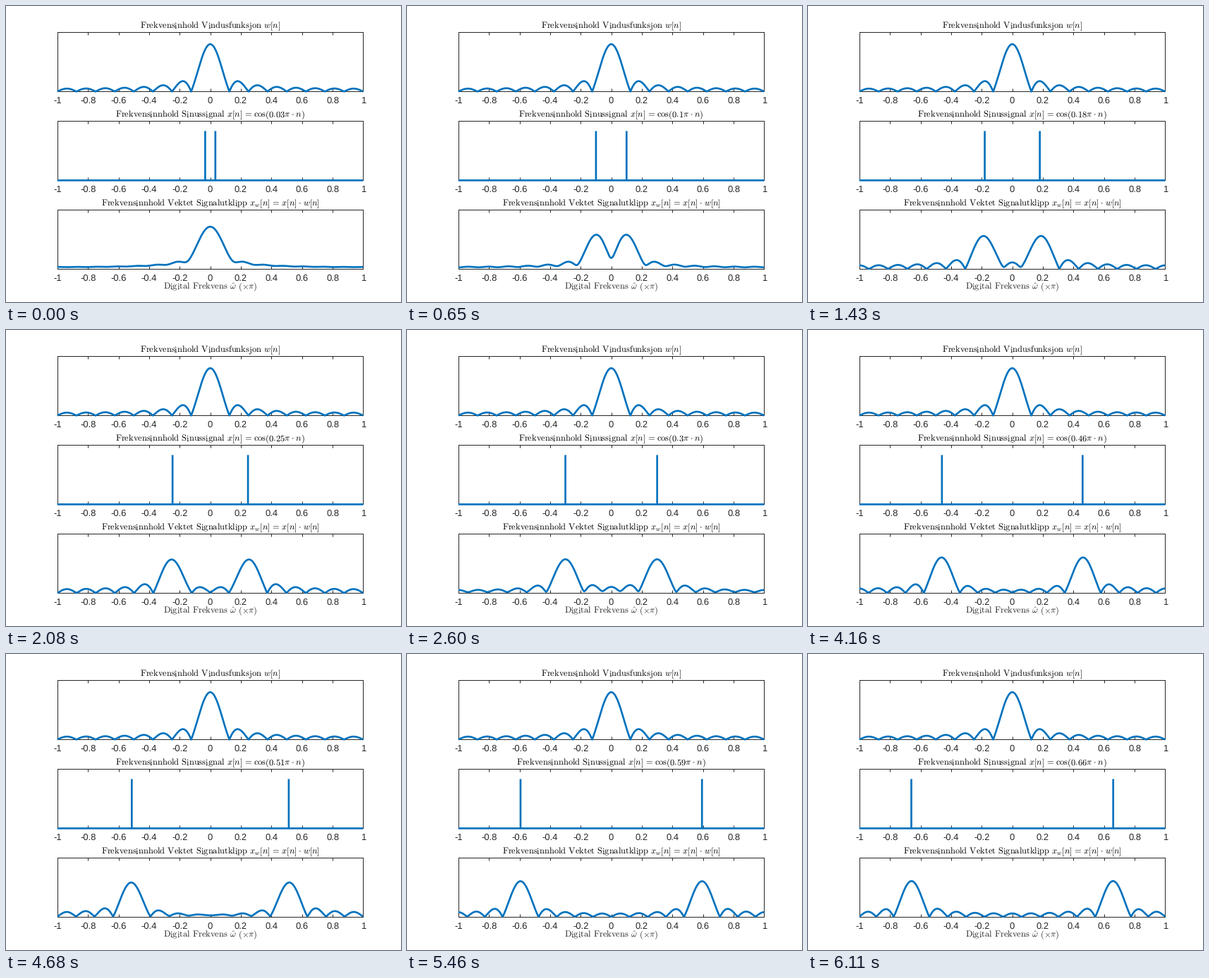
Animation of 560 by 420 pixels, one loop 6240 ms. Source, as a matplotlib script:

```python
import numpy as np
import matplotlib.pyplot as plt
from matplotlib.animation import FuncAnimation

W, H, DPI = 560, 420, 100
FRAMES, INTERVAL = 48, 130
N = 16                      # window length
BLUE, GREY = "#0072BD", "#262626"
LEFT, RIGHT, HEIGHT = 72.8, 506.4, 84
BOTTOMS = (298.6, 172.6, 46.6)
TICK_PX, TEXT_PX = 13, 12.45

plt.rcParams.update({
    "font.family": "Liberation Sans",
    "mathtext.fontset": "cm",
    "axes.unicode_minus": False,
    "text.hinting": "none",
})


def pt(px):
    return px * 72 / DPI


def roman(words):
    gap = r"\hspace{0.38}"
    return gap.join(r"\mathrm{%s}" % w for w in words.split()) + gap


EQ = r"\hspace{0.116}=\hspace{0.116}"
DOT = r"\hspace{0.053}\cdot\hspace{0.053}"

fig = plt.figure(figsize=(W / DPI, H / DPI), dpi=DPI, facecolor="white")


def label(x, y, text, size, color):
    return fig.text(x / W, 1 - y / H, text, fontsize=pt(size), color=color,
                    ha="center", va="baseline")


def heading(row, body):
    return label((LEFT + RIGHT) / 2, 31.4 + 126 * row, body, TEXT_PX, "black")


def panel(row, ymax):
    ax = fig.add_axes([LEFT / W, BOTTOMS[row] / H, (RIGHT - LEFT) / W, HEIGHT / H])
    ax.set(xlim=(-1, 1), ylim=(0, ymax), yticks=[])
    ticks = np.linspace(-1, 1, 11)
    ax.set_xticks(ticks)
    ax.tick_params(axis="x", direction="in", top=True, length=pt(4.3),
                   width=pt(1), color=GREY, labelbottom=False)
    for side in ax.spines.values():
        side.set(color=GREY, linewidth=pt(1))
    for t in ticks:
        x = LEFT + (t + 1) / 2 * (RIGHT - LEFT)
        label(x, 138 + 126 * row, f"{round(t, 1) + 0:g}", TICK_PX, GREY)
    return ax


def draw(ax, x, y):
    return ax.plot(x, y, color=BLUE, lw=pt(2.67), clip_on=False, zorder=5, snap=False,
                   solid_capstyle="butt", solid_joinstyle="round")[0]


w = np.linspace(-1, 1, 2401)
n = np.arange(N)
kernel = np.exp(-1j * np.pi * np.outer(w, n))

ax_win, ax_sine, ax_prod = panel(0, 20), panel(1, 1.2), panel(2, 14)

draw(ax_win, w, np.abs(kernel.sum(axis=1)))
draw(ax_sine, [-1, 1], [0, 0])
spikes = [draw(ax_sine, [0, 0], [0, 1]) for _ in range(2)]
product = draw(ax_prod, w, 0 * w)

heading(0, f"${roman('Frekvensinhold Vindusfunksjon')}w[n]$")
sine_title = heading(1, "")
heading(2, f"${roman('Frekvensinnhold Vektet Signalutklipp')}x_w[n]{EQ}x[n]{DOT}w[n]$")
label((LEFT + RIGHT) / 2, 402.3,
      rf"${roman('Digital Frekvens')}\hat{{\omega}}\hspace{{0.38}}(\times\pi)$",
      TEXT_PX, GREY)


def update(i):
    f = (i + 2.5) / 75
    for line, s in zip(spikes, (-f, f)):
        line.set_xdata([s, s])
    product.set_ydata(np.abs(kernel @ np.cos(np.pi * f * n)))
    sine_title.set_text(
        rf"${roman('Frekvensinnhold Sinussignal')}x[n]{EQ}"
        rf"\mathrm{{cos}}({round(f, 2):g}\pi{DOT}n)$")
    return [*spikes, product, sine_title]


anim = FuncAnimation(fig, update, frames=FRAMES, interval=INTERVAL,
                     repeat=True, repeat_delay=0, blit=False)
plt.show()
```
